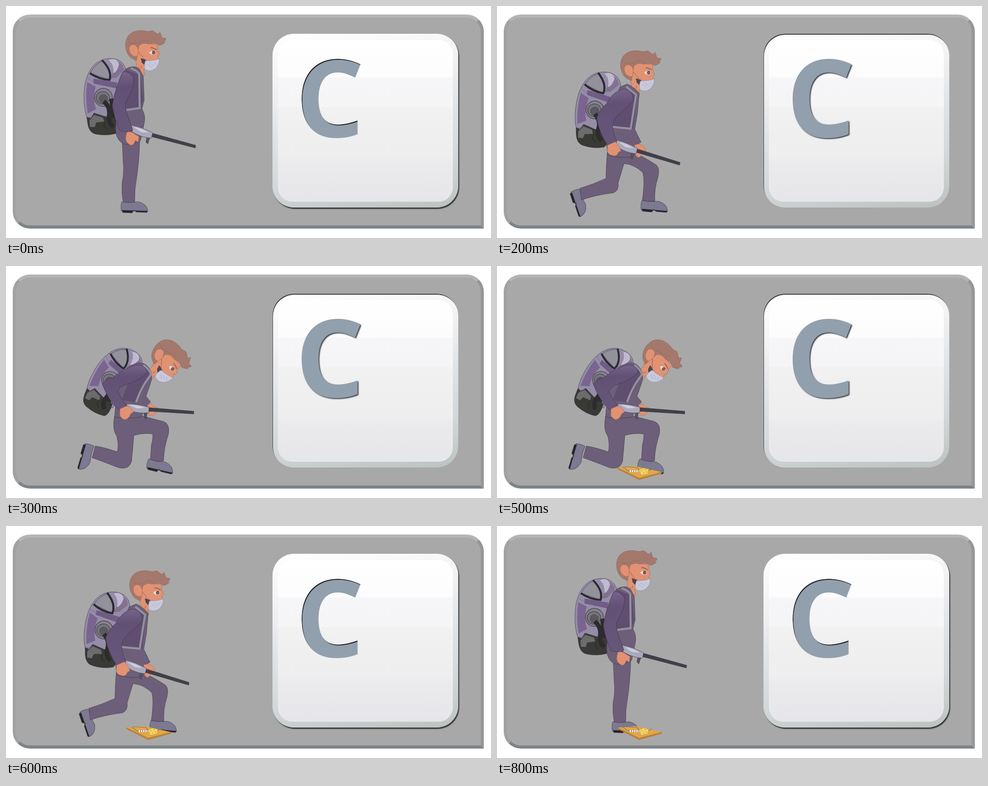
Animation of 1081x518 px, one loop 900 ms. Source, as an HTML page:

```html
<!DOCTYPE html>
<html lang="en">
<head>
<meta charset="utf-8">
<title>Pest controller key</title>
<style>
html, body { margin: 0; width: 100%; height: 100%; overflow: hidden; background: #fff; }
div, svg { position: absolute; box-sizing: border-box; }
#panel {
  left: 15px; top: 19px; width: 1050px; height: 478px; background: #a8a8a8;
  border: 7px solid; border-color: #b2b5b7 #959697 #7e8487 #9fa1a2;
  border-radius: 38px 38px 0 38px;
}
#key {
  left: 594px; top: 62px; width: 414px; height: 388px; border-radius: 48px;
  background: linear-gradient(170deg, #fff, #f3f4f5 22%, #e2e5e8 48%, #d3d7d9 75%, #bbc2bf);
  box-shadow: 2px 3px 2px #333;
}
#key.down { box-shadow: inset 1px 2px 1px #333; }
#face {
  left: 12px; top: 14px; width: 390px; height: 361px; border-radius: 32px;
  background: linear-gradient(#fff, #fcfcfd 23%, #f6f6f9 23.5%, #f5f5f6 41%, #f1f1f2 42%, #eeeeef 73%, #ebebed 75%, #e6e6ea);
}
svg { left: 0; top: 0; stroke: #3a3142; stroke-width: .7; stroke-linejoin: round; }
.letter { font: 700 241px "Open Sans", "Noto Sans", sans-serif; fill: #929fac; stroke: none; }
.drop { filter: drop-shadow(2px 2px 1px #3a3f45); }
.flat { stroke: none; }
.line { fill: none; }
.suit { fill: #6d5f79; }
.chest { fill: #5f4e70; stroke: none; }
.arm { fill: url(#sleeve); }
.skin { fill: #e09273; stroke: #a5634d; }
.hair { fill: #a4786c; stroke: #8a665c; }
.strap { fill: none; stroke: #93919e; stroke-width: 4.5; }
.black { fill: #393936; }
.wire { fill: none; stroke: #77706a; stroke-width: 1.2; }
</style>
</head>
<body>
<div id="panel"></div>
<div id="key"><div id="face"></div></div>
<svg width="1081" height="518" viewBox="0 0 1081 518">
<defs>
  <linearGradient id="sleeve" x2="0" y2="1"><stop stop-color="#78638a"/><stop offset=".25" stop-color="#625174"/><stop offset="1" stop-color="#66577a"/></linearGradient>
  <clipPath id="cut"><text class="letter" x="645" y="292.5">C</text></clipPath>

  <g id="head">
    <path class="skin" d="M284 92L310 80Q326 88 337 84L338 97L342 107L338 113L342 119L330 142L307 141L309 154L287 154L291 128L283 112Z"/>
    <path class="hair" d="M280 117C265 106 262 80 273 66C284 53 303 53 316 57L327 55Q332 58 335 61Q341 65 343 58Q346 66 348 71Q354 72 357 72Q356 78 351 80L355 81Q349 87 341 88Q334 80 318 85Q305 80 296 89L291 122Z"/>
    <path class="line" stroke="#8a665c" d="M272 80Q287 87 300 80Q310 74 318 79"/>
    <path class="skin" d="M293 112Q282 115 276 103Q271 90 282 86Q293 86 295 99Z"/>
    <path class="line" stroke="#70483b" d="M295 102L309 120M303 133L300 140"/>
    <path d="M301 117L313 121L309 132L303 126Z" fill="#4b4650"/>
    <path d="M311 122Q327 123 342 118Q342 132 331 141Q319 148 309 141Q307 131 311 122Z" fill="#c9c9dc" stroke="#8b889c"/>
    <path class="line" stroke="#9f9db2" d="M315 130L325 137M320 127L330 133M330 126L335 131"/>
    <path class="flat" d="M319 104Q325 97 334 102L333 108Q325 111 319 104Z" fill="#e4dedd"/>
    <ellipse cx="329" cy="104" rx="3.6" ry="4" fill="#865b50" stroke-width=".4"/>
    <path class="line" stroke="#9a5f4e" stroke-width="2" d="M322 93Q329 93 336 98"/>
  </g>

  <g id="pack">
    <path d="M181 250C171 228 172 180 180 160C188 135 205 117 235 117C255 118 266 130 269 150L262 172L255 258L240 264L195 247Z" fill="#958ca8"/>
    <path class="flat" d="M181 170L200 180Q192 210 201 230L182 240Q176 204 181 170Z" fill="#796590"/>
    <path class="flat" d="M195 162L248 171L246 184L195 173Z" fill="#705c84"/>
    <path class="line" stroke="#69617a" d="M180 160Q200 175 250 184"/>
    <path class="flat" d="M241 123Q260 124 263 142L246 160L233 162Q242 144 241 123Z" fill="#81728f"/>
    <path class="flat" d="M229 121Q246 113 252 130Q248 147 239 150Q242 132 229 121Z" fill="#c0bad0"/>
    <path d="M188 150Q198 130 214 123Q236 143 231 165Z" fill="#92919c"/>
    <path class="line" stroke="#2c2a30" stroke-width="4.5" d="M187 150Q207 164 231 165Q237 144 214 121"/>
    <path class="black" d="M180 248L189 251L196 239L222 247L250 250Q256 278 247 284Q225 291 200 286Q185 283 182 262Z"/>
    <path class="flat" d="M186 256L196 243L216 249L219 258L201 260L198 270L187 270Z" fill="#6c6b6d"/>
    <g stroke="#56545b" stroke-width="2">
      <ellipse cx="217" cy="204" rx="20" ry="20" fill="#86838e"/>
      <ellipse cx="216" cy="205" rx="15" ry="14" fill="#77747f"/>
      <ellipse cx="217" cy="207" rx="9" ry="9" fill="#5b5960"/>
    </g>
    <path class="line" stroke="#2d2c2d" stroke-width="10" d="M218 213Q233 226 230 244T240 270M235 207L240 250"/>
    <path class="line" stroke="#171717" d="M221 258Q214 270 227 274"/>
  </g>

  <g id="gun">
    <path d="M314 290L312 304L316 308L321 293" fill="#57555e"/>
    <path d="M326 284L423 311L422 317L325 292Z" fill="#414047"/>
    <path d="M279 266Q302 270 327 283L324 295Q302 294 281 281Z" fill="#aaa8bb"/>
    <path class="flat" d="M284 270Q303 273 318 283L301 281Z" fill="#d0cede"/>
  </g>

  <g id="shoe">
    <path d="M258 437Q275 440 295 437Q315 442 316 458L257 458Q255 445 258 437Z" fill="#7c7991"/>
    <path d="M259 456L316 458L314 461L290 460L285 455L281 462L260 461Z" fill="#252429"/>
  </g>

  <g id="lean">
    <use href="#pack" transform="translate(6 -5) rotate(7 231 165)"/>
    <use href="#head" transform="translate(9 10)"/>
    <path class="suit" d="M274 146L290 139Q307 147 317 160L313 205L307 240L321 269L308 277L302 302Q275 306 248 298L244 275L254 200Z"/>
    <path class="chest" d="M278 150L312 163L304 239L258 238L262 200Z"/>
    <path class="strap" d="M288 145L310 163L298 239L258 235"/>
    <path class="skin" d="M307 275Q322 269 331 284L332 293L322 292Q323 302 314 303Q306 298 307 285Z"/>
    <use href="#gun" transform="translate(-14 0) rotate(2 327 289)"/>
    <path class="arm" d="M282 150Q306 156 303 178Q281 200 268 210Q255 225 258 240Q261 255 267 267L248 278Q227 248 222 215Q230 195 245 182Q258 156 282 150Z"/>
    <path class="skin" d="M246 276L264 268Q275 280 276 289L271 291Q267 302 258 299Q246 297 246 288Z"/>
  </g>
</defs>

<g clip-path="url(#cut)" id="carved">
  <text class="letter" x="645" y="292.5" style="fill:#17191c">C</text>
  <text class="letter" x="646.5" y="294.5">C</text>
</g>
<text id="raised" class="letter drop" x="645" y="292.5">C</text>

<g id="stand">
  <use href="#pack"/>
  <use href="#head"/>
  <use href="#shoe"/>
  <path class="suit" d="M259 300L261 345Q264 370 259 393Q257 415 261 437Q274 441 287 437Q286 410 291 385Q297 345 298 300Z"/>
  <path class="suit" d="M268 140Q285 131 297 140L306 157L308 210L303 230Q312 245 308 262L300 300Q285 311 262 308Q246 300 244 276L250 180Q254 150 268 140Z"/>
  <path class="chest" d="M266 142L300 155L306 210L300 228L262 230Z"/>
  <path class="strap" d="M278 139Q296 146 297 153L298 228L268 232"/>
  <use href="#gun"/>
  <path class="arm" d="M260 147Q241 190 237 222Q240 245 253 278Q270 284 283 277Q274 254 269 238Q262 220 272 204Q286 183 284 160Q273 144 260 147Z"/>
  <path class="skin" d="M269 282Q278 278 290 288L296 291L295 304L288 300Q286 310 279 311Q265 305 267 293Z"/>
</g>

<g id="walk">
  <use href="#shoe" transform="translate(19 -20) rotate(14 258 460)"/>
  <use href="#shoe" transform="translate(-41 -9) rotate(13 258 460)"/>
  <path class="suit" d="M283 295L306 297Q312 325 336 353Q340 362 334 372Q316 395 311 422Q297 422 284 415Q290 390 305 371Q305 363 290 348L277 342Z"/>
  <path class="suit" d="M248 290L249 330Q247 360 236 385Q232 410 228 428Q242 434 254 433Q256 405 272 378Q282 350 288 312L300 297Z"/>
  <use href="#lean"/>
</g>

<g id="lunge">
  <use href="#shoe" transform="translate(64 -3) rotate(3 258 460)"/>
  <use href="#shoe" transform="translate(-95 -43) rotate(69 258 460)"/>
  <path class="suit" d="M246 325Q243 360 243 385Q215 398 185 407L188 433Q220 422 260 417Q272 412 270 395L283 352Q305 353 325 372Q330 390 324 434Q338 438 352 436Q350 410 358 385Q364 362 355 355Q325 335 304 328Z"/>
  <use href="#lean" y="35"/>
</g>

<g id="kneel">
  <use href="#pack" transform="translate(262 229) rotate(30) scale(.95) translate(-231 -165)"/>
  <use href="#head" transform="translate(57 98) rotate(40 283 98)"/>
  <use href="#shoe" transform="translate(56 -7) rotate(11 258 460)"/>
  <use href="#shoe" transform="translate(-84 -63) rotate(104 258 460)"/>
  <path class="suit" d="M242 335Q236 365 247 380Q252 400 248 415Q220 405 199 402L192 428Q225 440 250 450Q275 456 280 435L285 378Q310 372 327 375Q328 385 324 400L322 432Q338 439 351 435Q352 405 362 375Q366 352 350 347L300 334Z"/>
  <path class="suit" d="M280 222Q307 208 320 230Q330 243 320 268L312 291L322 303L313 315L301 337Q270 343 242 337L246 290L255 240Z"/>
  <path class="chest" d="M286 222L312 223L323 243L290 304L258 300Z"/>
  <path class="strap" d="M306 221Q322 233 323 243Q302 268 290 304"/>
  <path class="skin" d="M316 309L323 307Q328 315 339 317L340 322L335 324Q332 335 323 334L315 329Z"/>
  <use href="#gun" transform="translate(-7 32) rotate(-11 327 289)"/>
  <path class="arm" d="M284 223Q308 216 315 236Q302 254 272 263Q250 270 250 281Q258 300 270 312L253 322Q231 306 215 265Q218 254 240 248Q262 229 284 223Z"/>
  <path class="skin" d="M254 319L270 312Q281 317 284 326L278 330Q273 343 264 343Q251 337 254 328Z"/>
</g>

<g id="trap">
  <path d="M269 450L317 473L367 460V463L317 477L269 453Z" fill="#c48530" stroke="#9a6a2a"/>
  <path class="flat" d="M269 450L309 447L367 460L317 473Z" fill="#e3a649"/>
  <path class="wire" d="M280 449L292 457L315 459M283 448L312 450L318 457M345 453L338 457"/>
  <path class="wire" style="stroke:#f0ecec;stroke-width:4" d="M294 458L317 458"/>
  <path class="wire" style="stroke:#6b5a5c;stroke-width:4;stroke-dasharray:1.2 3.8" d="M294 458L317 458"/>
  <path d="M317 455L327 451L338 454L336 464L321 467Z" fill="#f2d566" stroke="#c69b36"/>
  <path class="wire" style="stroke:#c99f3d;stroke-width:2.4;stroke-linecap:round" d="M323 457h.1M330 455h.1M327 462h.1M333 460h.1"/>
</g>
</svg>
<script>
const $ = id => document.getElementById(id);
const show = (id, on) => $(id).style.display = on ? "" : "none";
const poses = ["stand", "walk", "lunge", "kneel", "kneel", "kneel", "lunge", "walk", "stand"];

function draw(now) {
  const step = Math.floor(now % 900 / 100);
  const down = step > 0 && step < 6;
  for (const id of ["stand", "walk", "lunge", "kneel"]) show(id, id === poses[step]);
  $("key").className = down ? "down" : "";
  show("carved", !down);
  show("raised", down);
  // The trap is lowered for one step, then stays on the floor.
  show("trap", step > 3);
  $("trap").setAttribute("transform", `translate(0 ${step === 4 ? -40 : 0})`);
}

const start = performance.now();
function tick() {
  draw(performance.now() - start);
  requestAnimationFrame(tick);
}
tick();
</script>
</body>
</html>
```
